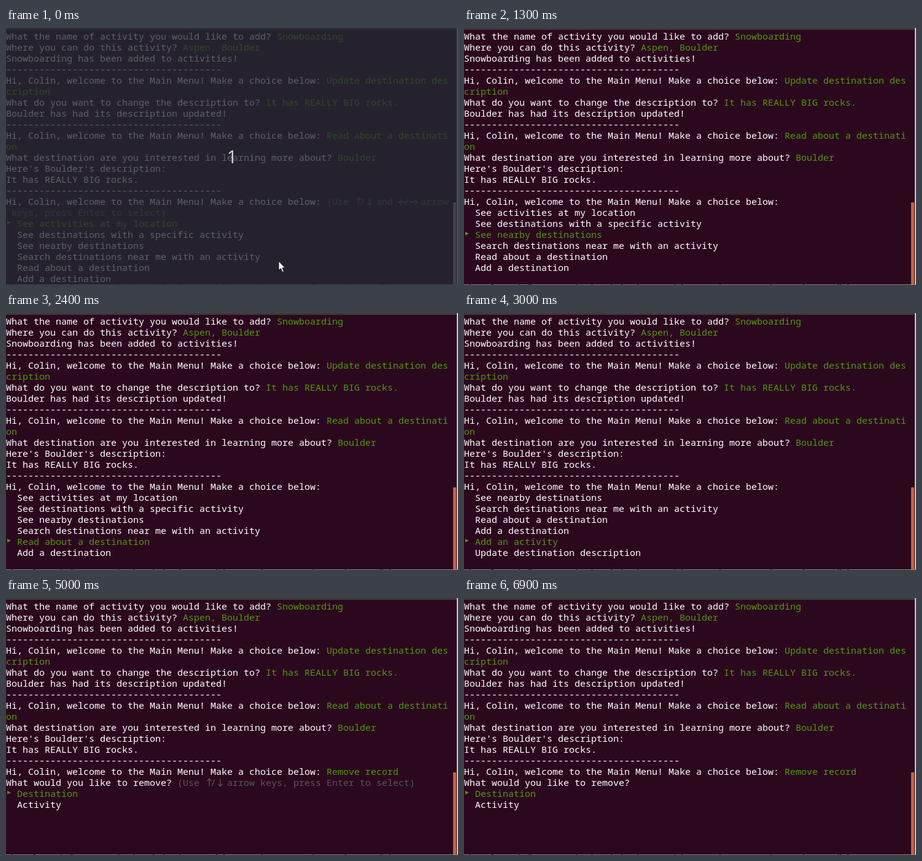
These frames come from a looping animation (736 px wide and 420 px high, 8000 ms). An HTML page with a canvas:

```html
<!DOCTYPE html>
<html lang="en">
<head>
<meta charset="utf-8">
<title>Travel menu in a terminal</title>
<style>
html, body { margin: 0; width: 100%; height: 100%; overflow: hidden; background: #2c081f; }
canvas { display: block; }
</style>
</head>
<body>
<canvas id="stage" width="736" height="420"></canvas>
<script>
const ctx = document.getElementById('stage').getContext('2d');
const LOOP = 8000, CELL = 9, ROW = 18, PAGE = 6;
const BG = '#2c081f', WHITE = '#ffffff', GREEN = '#4e9a06', GREY = '#555753';
const RULE = '-'.repeat(39);
const MENU = 'Hi, Colin, welcome to the Main Menu! Make a choice below: ';
const REMOVE = 'What would you like to remove? ';

// Each row holds a white prompt and a green answer.
const history = [
  ['What the name of activity you would like to add? ', 'Snowboarding'],
  ['Where you can do this activity? ', 'Aspen, Boulder'],
  ['Snowboarding has been added to activities!'],
  [RULE],
  [MENU, 'Update destination des'],
  ['', 'cription'],
  ['What do you want to change the description to? ', 'It has REALLY BIG rocks.'],
  ['Boulder has had its description updated!'],
  [RULE],
  [MENU, 'Read about a destinati'],
  ['', 'on'],
  ['What destination are you interested in learning more about? ', 'Boulder'],
  ["Here's Boulder's description:"],
  ['It has REALLY BIG rocks.'],
  [RULE]
];
const menuItems = [
  'See activities at my location',
  'See destinations with a specific activity',
  'See nearby destinations',
  'Search destinations near me with an activity',
  'Read about a destination',
  'Add a destination',
  'Add an activity',
  'Update destination description',
  'Remove record',
  'Exit'
];
const recordTypes = ['Destination', 'Activity'];

// [start time, selected menu item]
const menuSteps = [[0, 0], [1300, 2], [1700, 3], [2400, 4], [2500, 5], [3000, 6], [3200, 7], [3600, 8]];

const rowY = row => 14 + row * ROW;

function rect(color, x, y, w, h) {
  ctx.fillStyle = color;
  ctx.fillRect(x, y, w, h);
}

function write(text, col, row, color) {
  ctx.font = '15px "Noto Sans Mono", monospace';
  ctx.fillStyle = color;
  ctx.fillText(text, col * CELL, rowY(row) + 5);
}

function prompt(row, question, answer = '') {
  write(question, 0, row, WHITE);
  write(answer, question.length, row, GREEN);
}

function arrow(col, row, angle) {
  const sideways = angle % Math.PI === 0;
  ctx.save();
  ctx.translate(col * CELL + 7, rowY(row) + (sideways ? 0.5 : -0.5));
  ctx.rotate(angle);
  ctx.strokeStyle = GREY;
  ctx.lineWidth = 1.3;
  ctx.beginPath();
  ctx.moveTo(-6, 0);
  ctx.lineTo(6, 0);
  ctx.moveTo(2.5, -3.5);
  ctx.lineTo(6, 0);
  ctx.lineTo(2.5, 3.5);
  ctx.stroke();
  ctx.restore();
}

function arrowPair(col, row, first, second) {
  arrow(col, row, first);
  write('/', col + 1, row, GREY);
  arrow(col + 2, row, second);
}

function hintStart(col, row) {
  write('(Use', col, row, GREY);
  arrowPair(col + 5, row, -Math.PI / 2, Math.PI / 2);
}

function list(items, selected, row) {
  const top = Math.max(0, selected - 4);
  items.slice(top, top + PAGE).forEach((item, i) => {
    const active = top + i === selected;
    write(item, 2, row + i, active ? GREEN : WHITE);
    if (!active) return;
    const y = rowY(row + i);
    ctx.beginPath();
    ctx.moveTo(2, y - 5);
    ctx.lineTo(8, y - 2);
    ctx.lineTo(2, y + 1);
    ctx.fill();
  });
}

function drawWindow(t) {
  rect(BG, 0, 0, 736, 420);
  rect('#3c3b37', 0, 0, 736, 3);
  rect('#cbc8c7', 734, 0, 2, 420);
  rect(t < 600 ? '#8c8784' : '#cf6039', 728, 285, 5, 134);
  rect('#8f8a8f', 0, 419, 736, 1);
  ctx.font = '15px "Liberation Sans", sans-serif';
  ctx.fillStyle = '#111';
  ctx.fillText('Lists of sample lines go under the window here, and they are shown to readers as they scroll down', 0, 430);
}

function drawSession(t) {
  history.forEach((line, row) => prompt(row, ...line));
  if (t >= 5000) {
    prompt(15, MENU, 'Remove record');
    prompt(16, REMOVE);
    if (t < 5900) {
      hintStart(REMOVE.length, 16);
      write('arrow keys, press Enter to select)', REMOVE.length + 9, 16, GREY);
    }
    list(recordTypes, t >= 5900 && t < 6900 ? 1 : 0, 17);
    return;
  }
  const hinted = t < 1300;
  prompt(15, MENU);
  if (hinted) {
    hintStart(MENU.length, 15);
    write('and', MENU.length + 9, 15, GREY);
    arrowPair(MENU.length + 13, 15, Math.PI, 0);
    write('arrow', MENU.length + 17, 15, GREY);
    write('keys, press Enter to select)', 1, 16, GREY);
  }
  const selected = menuSteps.filter(step => step[0] <= t).pop()[1];
  list(menuItems, selected, hinted ? 17 : 16);
}

function drawCountdown() {
  rect('rgba(36, 43, 50, 0.75)', 0, 0, 736, 420);
  ctx.font = '29px "Open Sans", sans-serif';
  ctx.fillStyle = '#dcdcdc';
  ctx.textAlign = 'center';
  ctx.fillText('1', 368, 221);
  ctx.textAlign = 'left';
}

function drawPointer() {
  const outline = [[0, 0], [0, 15], [3.5, 12], [6, 18], [8.5, 17], [6, 11], [10.5, 11]];
  ctx.beginPath();
  outline.forEach(([x, y]) => ctx.lineTo(444 + x, 381 + y));
  ctx.closePath();
  ctx.fillStyle = '#fff';
  ctx.fill();
  ctx.strokeStyle = '#111';
  ctx.lineWidth = 1;
  ctx.stroke();
}

function drawTextCursor() {
  const color = '#e6e2c8';
  rect(color, 445, 377, 1, 13);
  for (const y of [376, 390]) {
    rect(color, 443, y, 2, 1);
    rect(color, 446, y, 2, 1);
  }
}

function draw(t) {
  drawWindow(t);
  drawSession(t);
  if (t < 500) {
    drawCountdown();
    drawPointer();
  } else if (t < 900) {
    drawTextCursor();
  }
}

const start = performance.now();
function tick() {
  draw((performance.now() - start) % LOOP);
  requestAnimationFrame(tick);
}
tick();
</script>
</body>
</html>
```
